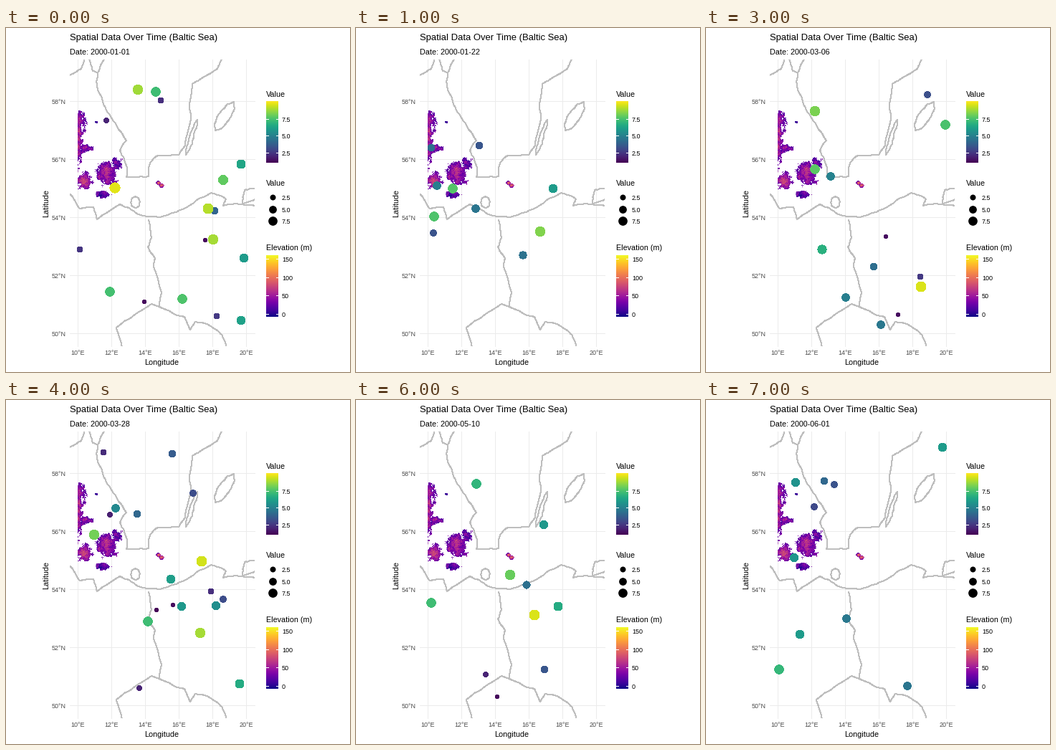
Write a matplotlib script that moves like this. It is 480 px wide and 480 px high and loops after 8000 ms.

```python
import numpy as np
import matplotlib.pyplot as plt
from matplotlib.animation import FuncAnimation

plt.rcParams["font.family"] = "Liberation Sans"
PX = 0.75  # points per pixel at 96 dpi
LEFT, RIGHT, TOP, BOTTOM = 89, 347, 44, 444

fig = plt.figure(figsize=(5, 5), dpi=96, facecolor="white")
ax = fig.add_axes([0, 0, 1, 1])
ax.axis("off")
rng = np.random.default_rng(7)
viridis, plasma = plt.get_cmap("viridis"), plt.get_cmap("plasma")


def text(x, y, s, size=10.7, color="black", **kw):
    return ax.text(x, y, s, fontsize=size * PX, color=color, **kw)


def line(xs, ys, color, z=1):
    return ax.plot(xs, ys, color=color, lw=PX, antialiased=False, zorder=z)[0]


def radius(value):
    size = 1 + 5 * np.sqrt((value - 1) / 9)
    return 0.375 * (2.845 * size + 0.945) + 0.4


# ---- graticule and axis text
for i in range(6):
    x = 100 + 47 * i
    line([x, x], [TOP, BOTTOM], "#EBEBEB")
    text(x, 456, f"{10 + 2 * i}°E", 9, "#4D4D4D", ha="center")
for i in range(5):
    y = 102 + 81 * i
    line([LEFT, RIGHT], [y, y], "#EBEBEB")
    text(84, y + 4, f"{58 - 2 * i}°N", 9, "#4D4D4D", ha="right")

text(89, 17, "Spatial Data Over Time (Baltic Sea)", 12.95)
date_text = text(89, 37, "")
text(217.5, 470.5, "Longitude", ha="center")
text(56, 244, "Latitude", rotation=90, ha="center", va="center")

# ---- coasts and borders: key points joined by fractal lines
panel = plt.Rectangle((LEFT, TOP), RIGHT - LEFT, BOTTOM - TOP, fc="none", ec="none")
ax.add_patch(panel)


def coast(*pts, rough=0.07):
    p = np.array(pts, float)
    for _ in range(3):
        step = np.diff(p, axis=0)
        shift = rng.uniform(-rough, rough, (len(step), 1))
        mid = p[:-1] + step / 2 + step[:, ::-1] * [-1, 1] * shift
        p = np.insert(p, range(1, len(p)), mid, axis=0)
    line(p[:, 0], p[:, 1], "#BEBEBE", 2).set_clip_path(panel)


def island(start, end, width):
    """Closed lens between two tips."""
    a, b = np.array(start), np.array(end)
    side = (b - a)[::-1] * [-1, 1] / np.hypot(*(b - a)) * width / 2
    angle = np.linspace(0, 2 * np.pi, 9)[:, None]
    coast(*((a + b) / 2 + np.cos(angle) * (a - b) / 2 + np.sin(angle) * side))


# north shore
coast((88, 66), (105, 57), (109, 43))
coast((116, 43), (121, 60), (128, 62), (128, 86), (147, 125), (168, 157), (159, 171),
      (169, 195), (168, 208), (199, 207), (201, 188), (212, 178), (241, 177),
      (250, 163), (256, 106), (260, 78), (295, 57), (301, 43))
coast((128, 62), (137, 43))
island((267, 128), (251, 177), 6)
island((318, 103), (292, 143), 16)

# south shore
coast((88, 231), (103, 252), (122, 250), (127, 267), (159, 246), (184, 260), (213, 264),
      (246, 253), (286, 230), (307, 239), (303, 248), (330, 246), (333, 226), (349, 224))
island((180, 235), (181, 251), 13)
for y in (238, 248):
    coast((330, 246), (349, y))

# land borders
corner = (214, 389)
coast((199, 268), (203, 292), (198, 306), (208, 322), (206, 333), (217, 369), corner)
coast(corner, (203, 385), (154, 418), (162, 446))
coast(corner, (249, 403), (257, 421), (264, 410), (281, 413), (302, 429), (308, 446))

# ---- elevation raster: rough ellipses of (cx, cy, rx, ry, peak)
LAND = [(103, 130, 9, 16, 35), (100, 153, 6, 38, 45), (111, 167, 10, 6, 20),
        (109, 213, 11, 13, 55), (140, 203, 15, 17, 35), (154, 189, 8, 10, 20),
        (135, 232, 11, 5, 0), (125, 131, 3, 2, 0), (213, 216, 4, 3, 80),
        (217, 219, 4, 3, 70)]

X, Y = np.meshgrid(np.arange(99, 226), np.arange(112, 243))
grain = rng.uniform(-1, 1, X.shape)
soft = rng.normal(size=X.shape)
for _ in range(3):
    for axis in (0, 1):
        soft = (np.roll(soft, 1, axis) + soft + np.roll(soft, -1, axis)) / 3
soft /= soft.std()

depth = np.full(X.shape, -9.0)
height = np.zeros(X.shape)
for cx, cy, rx, ry, peak in LAND:
    d = 1 - ((X - cx) / rx) ** 2 - ((Y - cy) / ry) ** 2
    depth = np.maximum(depth, d)
    height = np.maximum(height, peak * np.clip(d, 0, 1))
land = (depth + 0.3 * soft + 0.25 * grain > 0.1) & (X >= 100)
height = np.clip(14 + height + 9 * soft + 18 * grain, 0, 150)
ax.imshow(np.ma.masked_where(~land, height), cmap=plasma, vmin=-6, vmax=158,
          extent=(99, 226, 243, 112), aspect="auto", interpolation="nearest", zorder=3)


# ---- legends
def colorbar(title, top, cmap, ticks, zero, scale):
    bottom = top + 86
    text(363, top - 6.5, title)
    ax.imshow(np.linspace(1, 0, 256)[:, None], cmap=cmap, vmin=0, vmax=1,
              extent=(363, 380, bottom, top), aspect="auto", zorder=3)
    for tick in ticks:
        y = round(zero - scale * tick)
        for x in (363, 377):
            line([x, x + 3], [y, y], "white", 4)
        text(385, y + 4, f"{tick}", 9)


LEVELS = (2.5, 5.0, 7.5)
colorbar("Value", 102, viridis, LEVELS, 197.3, 9.4)
colorbar("Elevation (m)", 317, plasma, range(0, 151, 50), 399.2, 0.515)
text(363, 219.5, "Value")
for i, value in enumerate(LEVELS):
    y = 236 + 16.7 * i
    ax.scatter(371.5, y, s=(2 * radius(value) * PX) ** 2, c="black", lw=0, antialiased=False)
    text(385, y + 4, f"{value}", 9)

# ---- monthly samples: x, y, value
JAN = [(184, 86, 8.7), (209, 89, 7.2), (216, 101, 2.2), (140, 129, 1.9), (328, 190, 6.3),
       (303, 212, 7.8), (152, 223, 9.6), (291, 255, 3.9), (282, 252, 9), (278, 296, 1.2),
       (289, 295, 8.8), (103, 309, 2.4), (332, 321, 5.9), (145, 368, 7.3),
       (193, 382, 1.2), (246, 378, 7.5), (294, 402, 2.5), (328, 408, 6.1)]
FEB = [(172, 164, 3.4), (113, 220, 4.8), (135, 224, 7.6), (167, 252, 4.5), (109, 263, 7.5),
       (108, 286, 3.3), (233, 317, 4.4), (257, 284, 8.3), (275, 224, 5.9), (105, 167, 4.2)]
MAR = [(195, 376, 4.8), (174, 207, 5), (162, 309, 6.7), (251, 291, 1.3), (234, 333, 4.2),
       (152, 116, 8.2), (309, 93, 3.2), (268, 400, 1.3), (300, 361, 9.5), (152, 197, 7.7),
       (334, 135, 7.4), (299, 347, 2.5), (244, 414, 4.6)]
APR = [(145, 160, 1.8), (186, 402, 1.9), (303, 278, 3.1), (153, 151, 5.2), (261, 130, 3.1),
       (198, 309, 7.2), (232, 75, 3.6), (273, 225, 9.4), (245, 288, 5.8), (233, 286, 1.3),
       (136, 73, 2.1), (183, 159, 4), (123, 188, 8.1), (286, 267, 2.2), (230, 250, 6),
       (293, 287, 5.4), (210, 293, 1.1), (271, 325, 8.8), (326, 396, 6.5)]
MAY = [(168, 117, 6.9), (262, 174, 5.8), (215, 244, 7.9), (238, 258, 4.3), (282, 288, 6.5),
       (105, 283, 7.2), (249, 300, 9.5), (263, 376, 3.4), (181, 383, 1.9), (197, 414, 1.2)]
JUN = [(330, 66, 5.9), (125, 115, 5.6), (165, 113, 4), (179, 118, 3.3), (151, 149, 3),
       (123, 220, 5.7), (196, 305, 4.6), (131, 327, 5.9), (102, 376, 7), (281, 399, 4.5)]


def rows(month):
    """x, y, radius, rgba for every sample."""
    return np.array([(x, y, radius(v), *viridis((v - 1) / 9)) for x, y, v in month])


def halfway(a, b):
    """Paired samples meet midway; unpaired ones wait in place."""
    a, b = rows(a), rows(b)
    n = min(len(a), len(b))
    return np.vstack([(a[:n] + b[:n]) / 2, a[n:]])


STATES = [rows(JAN), rows(FEB), halfway(FEB, MAR), rows(MAR),
          rows(APR), halfway(APR, MAY), rows(MAY), rows(JUN)]
START = np.datetime64("2000-01-01")

dots = ax.scatter([], [], lw=0, zorder=5, antialiased=False)
ax.set_xlim(0, 480)
ax.set_ylim(480, 0)


def update(i):
    state = STATES[i]
    dots.set_offsets(state[:, :2])
    dots.set_sizes((2 * state[:, 2] * PX) ** 2)
    dots.set_facecolors(state[:, 3:])
    date_text.set_text(f"Date: {START + int(21.75 * i)}")
    return dots, date_text


anim = FuncAnimation(fig, update, frames=len(STATES), interval=1000, repeat=True)
plt.show()
```
